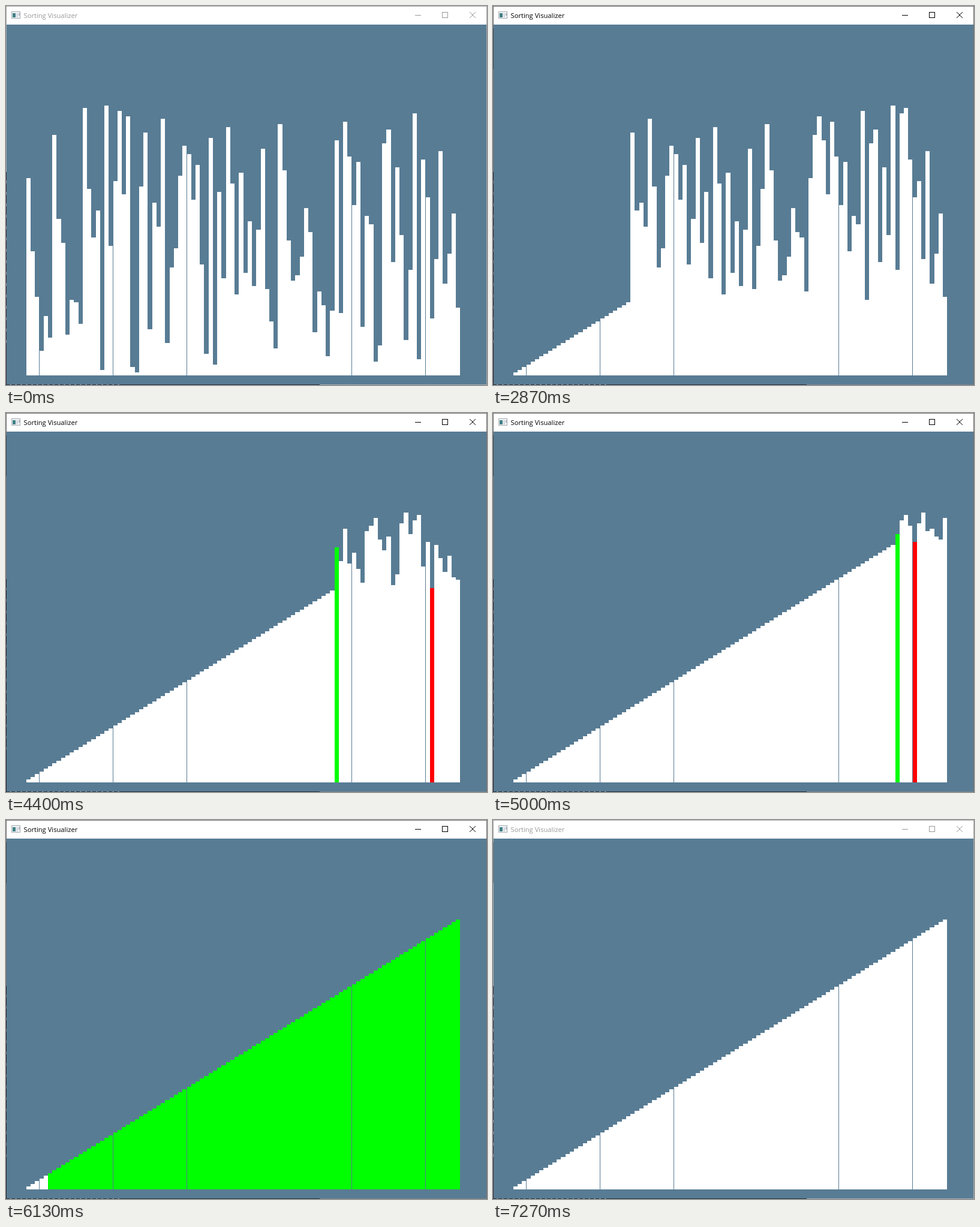
Recreate the animation shown at these times as an HTML page with a canvas. Size 802 by 632 pixels, loop 7390 ms.

```html
<!DOCTYPE html>
<html lang="en">
<head>
<meta charset="utf-8">
<title>Sorting Visualizer</title>
<style>
  html, body { margin: 0; width: 100%; height: 100%; overflow: hidden; }
  #win {
    --ink: #000; --edge: #707070;
    position: relative; width: 802px; height: 632px; background: #fff; overflow: hidden;
  }
  #win.idle { --ink: #999; --edge: #aaa; }
  svg, canvas { position: absolute; left: 0; top: 0; display: block; }
  .title { font: 11.2px "Open Sans", "Noto Sans", sans-serif; fill: var(--ink); }
  .line { fill: none; stroke: var(--ink); }
  .edge { fill: var(--edge); }
</style>
</head>
<body>
<div id="win" class="idle">
  <canvas id="view" width="802" height="632"></canvas>
  <svg width="802" height="632" shape-rendering="crispEdges">
    <path class="edge" d="M0 0H802V632H801V1H0Z"/>
    <rect x="9.5" y="9.5" width="14" height="11" fill="#f4f6f7" stroke="#a3a9ad"/>
    <rect x="11" y="12" width="5" height="7" fill="#3f7f86"/>
    <rect x="17" y="12" width="3" height="7" fill="#d3d9e2"/>
    <rect x="21" y="12" width="2" height="4" fill="#b4bcc6"/>
    <text class="title" x="29.5" y="20">Sorting Visualizer</text>
    <path class="line" d="M682 15.5h10M727.5 10.5h9v9h-9z"/>
    <path class="line" shape-rendering="auto" d="M773 10l10 10M783 10l-10 10"/>
  </svg>
</div>
<script>
const START = [
  73, 46, 29, 9, 22, 14, 89, 58, 49, 15, 28, 27, 19, 99, 69, 51, 61, 2, 100, 48,
  72, 98, 67, 96, 3, 1, 70, 90, 17, 64, 55, 95, 12, 40, 47, 74, 85, 82, 65, 78,
  41, 8, 88, 4, 68, 36, 92, 71, 30, 75, 38, 57, 33, 54, 84, 32, 20, 10, 93, 76,
  50, 35, 37, 44, 62, 53, 16, 31, 26, 7, 24, 87, 23, 94, 81, 63, 79, 18, 59, 56,
  5, 11, 86, 91, 42, 77, 52, 13, 39, 97, 6, 80, 66, 21, 43, 83, 34, 45, 60, 25
];
const LOOP = 7390, COUNT = START.length;
const TICK = 1000 / 144, SWAP = 5 * TICK;       // one screen refresh, one sorting step
const SORT_AT = 1934, GREEN_AT = 5398, WHITE_AT = GREEN_AT + COUNT * TICK;
const LEFT = 33.802, PITCH = 7.236, BAR = 7.2, FLOOR = 616;
const BACK = '#587c94', WHITE = '#fff', GREEN = '#0f0', RED = '#f00';

const win = document.getElementById('win');
const ctx = document.getElementById('view').getContext('2d');
const snap = x => Math.ceil(x - 0.5);
const clamp = n => Math.max(0, Math.min(COUNT, Math.floor(n)));

function box(x, y, w, h, color) {
  ctx.fillStyle = color;
  ctx.fillRect(x, y, w, h);
}

function stepAt(t) {
  const r = t % 200;
  return 3 * Math.floor(t / 200) + (r >= 70) + (r >= 130);
}

// Selection sort after n swaps
function sorted(n) {
  const a = START.slice();
  for (let i = 0; i < n; i++) {
    const m = a.indexOf(i + 1);
    [a[i], a[m]] = [a[m], a[i]];
  }
  return a;
}

function drawBars(time) {
  const pos = Math.max(0, (time - SORT_AT) / SWAP);
  const i = clamp(pos);
  const marked = time >= SORT_AT && i < COUNT && pos - i < 0.8;
  const bars = sorted(clamp(pos + 0.2));
  const low = marked ? bars.indexOf(i + 1) : -1;
  const green = clamp((time - GREEN_AT) / TICK);
  const white = clamp((time - WHITE_AT) / TICK);
  bars.forEach((v, n) => {
    const x = LEFT + PITCH * n, x0 = snap(x);
    const y = Math.floor(FLOOR - 4.5 * v);
    let color = n >= white && n < green ? GREEN : WHITE;
    if (marked && n === i) color = GREEN;
    if (n === low && low !== i) color = RED;
    box(x0, y, snap(x + BAR) - x0, FLOOR - y, color);
  });
}

// Slivers of what lies behind the window
function drawEdges(step, idle) {
  const pale = idle ? '#aaa' : '#707070', dark = idle ? '#3a2c35' : '#251c24';
  box(0, 0, 1, 277, pale);
  if (step >= 26) box(0, 37, 1, 68, idle ? '#777' : '#444');
  box(0, 277, 1, 355, dark);
  for (let y = 291; y < 570; y += 19) box(0, y, 1, 5, idle ? '#8a8087' : '#5c555a');
  box(0, 631, 523, 1, '#25303c');
  box(523, 631, 279, 1, idle ? '#a4adb4' : '#77828b');
  for (let x = 6; x < 188; x += 9) box(x, 631, 3, 1, '#7d8791');
}

function draw(now) {
  const step = stepAt(now % LOOP);
  const idle = step < 27 || step >= 109;
  win.className = idle ? 'idle' : '';
  ctx.clearRect(0, 0, 802, 632);
  box(1, 31, 800, 600, BACK);
  drawEdges(step, idle);
  drawBars(step * 200 / 3);
}

let begin;
function loop(now) {
  begin ??= now;
  draw(now - begin);
  requestAnimationFrame(loop);
}
draw(0);
requestAnimationFrame(loop);
</script>
</body>
</html>
```
